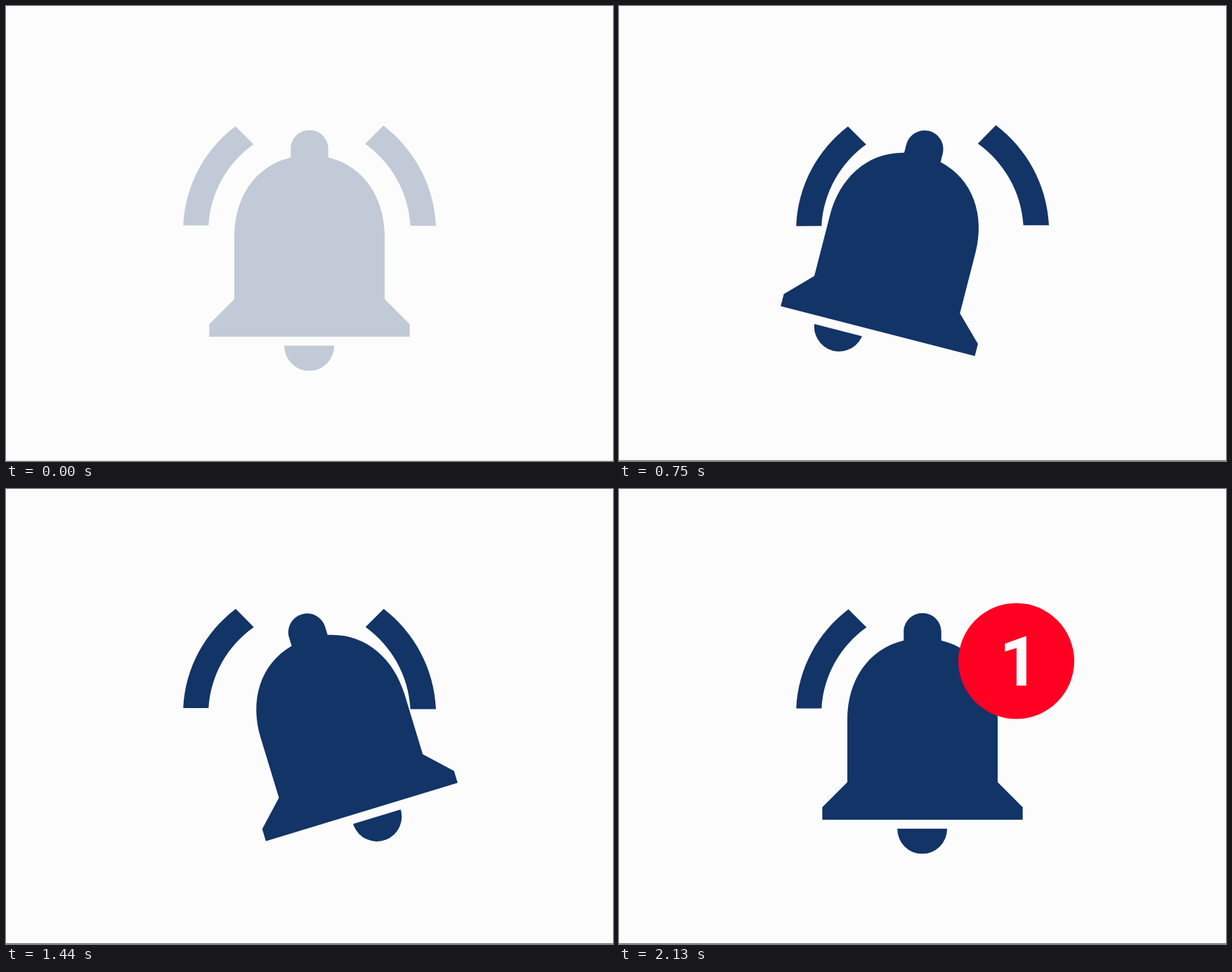
Animation, 864 px wide and 648 px high, one loop 2.73 s. Source, as an HTML page with a canvas:

```html
<!DOCTYPE html>
<html lang="en">
<head>
<meta charset="utf-8">
<title>Notification bell</title>
<style>
  html, body { margin: 0; width: 100%; height: 100%; overflow: hidden; background: #fcfcfc; }
  canvas { display: block; }
</style>
</head>
<body>
<canvas id="stage" width="864" height="648"></canvas>
<script>
const ctx = document.getElementById('stage').getContext('2d');
const LOOP = 2730, STEP = 30;
const RING_START = 300;
const PAPER = '#fcfcfc', NAVY = '#123466', RED = '#ff0022';
const PIVOT = { x: 432, y: 215 };

// Icon outlines on a 24-unit grid
const bell = new Path2D('M18 11c0-3.07-1.64-5.64-4.5-6.32V4c0-.83-.67-1.5-1.5-1.5s-1.5.67-1.5 1.5v.68C7.63 5.36 6 7.92 6 11v5l-2 2v1h16v-1l-2-2z');
const leftArc = new Path2D('M7.58 4.08L6.15 2.65C3.75 4.48 2.17 7.3 2.03 10.5h2c.15-2.65 1.51-4.97 3.55-6.42z');
const rightArc = new Path2D('M19.97 10.5h2c-.15-3.2-1.73-6.02-4.12-7.85l-1.42 1.43c2.02 1.45 3.39 3.77 3.54 6.42z');

// Degrees; "first" is the time of the first peak, "half" the time from peak to peak
const bellSwing = { first: 463, half: 245.7, peaks: 5, amp: -16.95 };
const clapperSwing = { first: 585, half: 240, peaks: 6, amp: -21.8 };
const arcSwing = { first: 504, half: 246, peaks: 6, amp: 0.25 };

function ease(t, from, to) {
  const p = Math.min(1, Math.max(0, (t - from) / (to - from)));
  return p * p * (3 - 2 * p);
}

// Eases from rest to the first peak, alternates sides, then eases back to rest
function swing(t, { first, half, peaks, amp }) {
  if (t < first) return amp * ease(t, RING_START, first);
  const k = Math.min(Math.floor((t - first) / half), peaks - 1);
  const from = first + k * half;
  const travel = k === peaks - 1 ? 1 : 2;
  const side = k % 2 ? -1 : 1;
  return side * amp * (1 - travel * ease(t, from, from + half));
}

function turn(deg, x, y) {
  ctx.translate(x, y);
  ctx.rotate(deg * Math.PI / 180);
  ctx.translate(-x, -y);
}

function fillIcon(path, x, y, scale) {
  ctx.save();
  ctx.translate(x, y);
  ctx.scale(scale, scale);
  ctx.fill(path);
  ctx.restore();
}

function disc(x, y, r) {
  ctx.beginPath();
  ctx.arc(x, y, r, 0, 2 * Math.PI);
  ctx.fill();
}

function drawArcs(t) {
  ctx.save();
  turn(swing(t, arcSwing), 432, 315);
  fillIcon(leftArc, 215.7, 123.4, 18.02);
  fillIcon(rightArc, 212.6, 122.1, 18.18);
  ctx.restore();
}

function drawBell(t) {
  ctx.save();
  turn(swing(t, bellSwing), PIVOT.x, PIVOT.y);
  fillIcon(bell, 218.04, 132.2, 17.83);
  // The clapper only shows below the rim
  ctx.beginPath();
  ctx.rect(200, 483.7, 464, 140);
  ctx.clip();
  turn(swing(t, clapperSwing), PIVOT.x, PIVOT.y);
  disc(431.6, 484.2, 35.4);
  ctx.restore();
}

function drawBadge(t) {
  const s = ease(t, 1860, 2132);
  if (s === 0) return;
  ctx.save();
  ctx.translate(565.5, 245);
  ctx.scale(s, s);
  ctx.fillStyle = RED;
  disc(0, 0, 82.5);
  ctx.fillStyle = PAPER;
  ctx.font = 'bold 98.5px Roboto, Inter, sans-serif';
  const inkRight = ctx.measureText('1').actualBoundingBoxRight;
  ctx.fillText('1', 14.7 - inkRight, 35);
  ctx.restore();
}

function draw(t) {
  ctx.globalAlpha = 1;
  ctx.fillStyle = PAPER;
  ctx.fillRect(0, 0, 864, 648);
  ctx.globalAlpha = 0.25 + 0.75 * ease(t, 60, 294);
  ctx.fillStyle = '#666';
  ctx.fillRect(0, 647, 864, 1);
  ctx.fillStyle = NAVY;
  drawArcs(t);
  drawBell(t);
  drawBadge(t);
}

const start = performance.now();
function tick() {
  const t = (performance.now() - start) % LOOP;
  draw(Math.floor(t / STEP) * STEP);
  requestAnimationFrame(tick);
}
tick();
</script>
</body>
</html>
```
